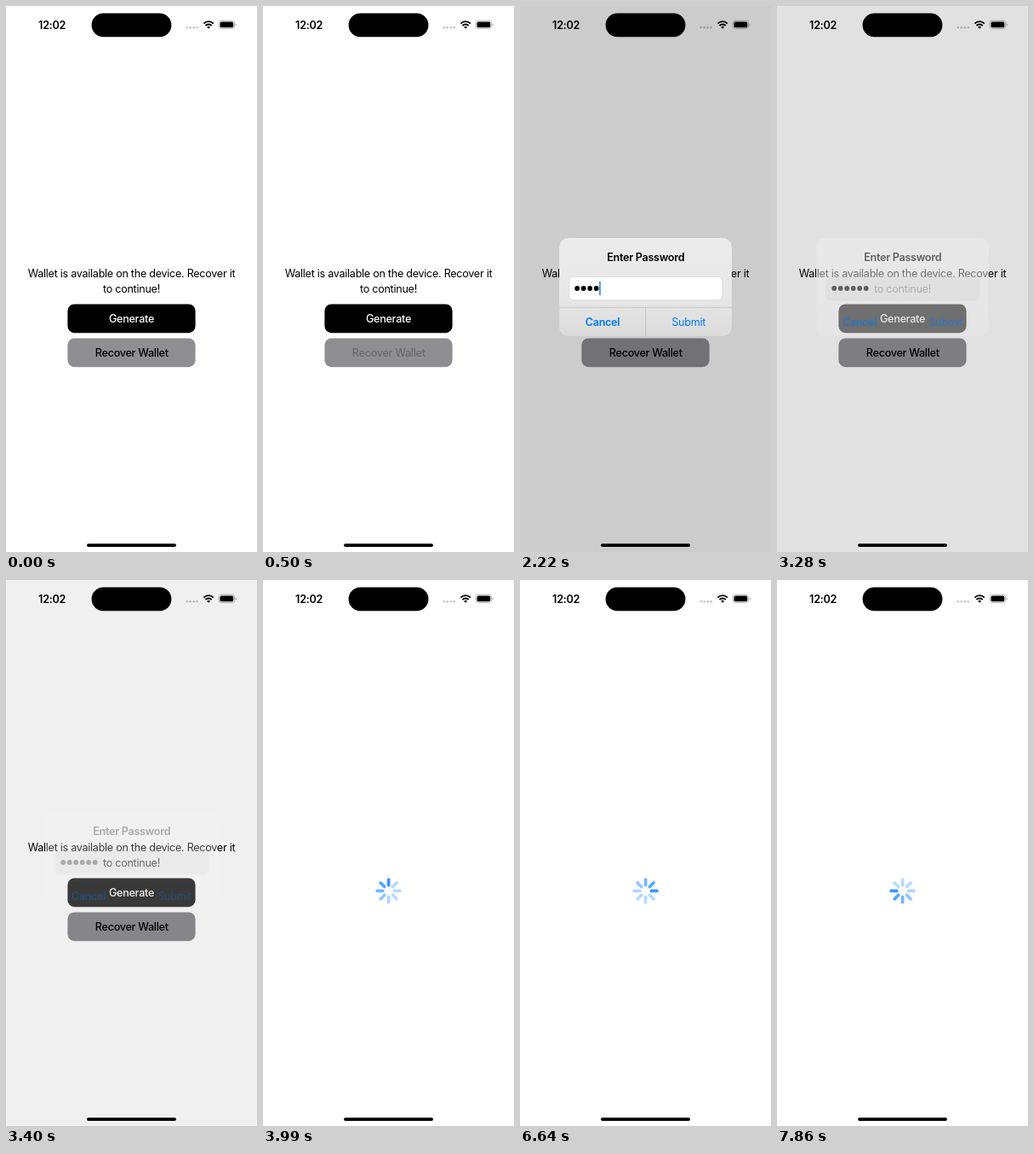
An HTML page for the animation above (8000 ms loop, 295 px wide and 640 px high).

```html
<!DOCTYPE html>
<html lang="en">
<head>
<meta charset="utf-8">
<title>Wallet recovery</title>
<style>
  html, body { margin: 0; width: 100%; height: 100%; overflow: hidden; background: #fff; }
  svg { display: block; width: 295px; height: 640px; }
  text { font: 400 12.6px Inter, sans-serif; letter-spacing: -.022em; text-anchor: middle; }
  .semi { font-weight: 600; }
  .medium { font-weight: 500; }
  .left { text-anchor: start; }
  .blue { fill: #007aff; }
</style>
</head>
<body>
<svg viewBox="0 0 295 640">
  <g id="home">
    <text x="147.5" y="318.4">Wallet is available on the device. Recover it</text>
    <text x="147.5" y="336.2">to continue!</text>
    <rect x="72.4" y="349.4" width="150.2" height="33.8" rx="8"/>
    <text class="medium" x="147.5" y="371" fill="#fff">Generate</text>
    <rect x="72.4" y="389.4" width="150.2" height="33.8" rx="8" fill="#8e8e93"/>
    <text class="medium" id="recover" x="147.8" y="411">Recover Wallet</text>
  </g>
  <g id="spinner" transform="translate(147.6 364.4)" stroke="#007aff" stroke-width="3.8" stroke-linecap="round"></g>

  <g id="status">
    <text class="semi" x="54.1" y="26.6">12:02</text>
    <g fill="#c4c4c6">
      <circle cx="212.7" cy="25.3" r="1.3"/><circle cx="216.7" cy="25.3" r="1.3"/>
      <circle cx="220.7" cy="25.3" r="1.3"/><circle cx="224.7" cy="25.3" r="1.3"/>
    </g>
    <g fill="none" stroke="#000" stroke-width="1.8">
      <path d="M232.4 20.6a8 8 0 0 1 11.4 0"/>
      <path d="M234.5 23a5.1 5.1 0 0 1 7.2 0"/>
    </g>
    <path d="M236.2 24.7a2.7 2.7 0 0 1 3.8 0l-1.9 2z"/>
    <rect x="250.2" y="17.2" width="18.4" height="9.4" rx="3" fill="none" stroke="#a5a5a5" stroke-width=".8"/>
    <rect x="251.5" y="18.5" width="15.8" height="6.8" rx="1.9"/>
    <path d="M269.7 20.4a1.6 1.6 0 0 1 0 3z" fill="#a5a5a5"/>
  </g>

  <rect id="dim" width="295" height="640"/>
  <rect x="100.6" y="8.5" width="93.8" height="27.7" rx="13.8"/>
  <rect x="95" y="630.2" width="105" height="3.8" rx="1.9"/>

  <g id="dialog">
    <linearGradient id="tint" x2="0" y2="1">
      <stop stop-opacity=".03"/><stop offset=".6" stop-opacity=".05"/><stop offset="1" stop-opacity=".1"/>
    </linearGradient>
    <rect id="panel" x="46.2" y="272" width="202.7" height="115" rx="10.5" fill="#f3f3f3"/>
    <rect id="shade" x="46.2" y="272" width="202.7" height="115" rx="10.5" fill="url(#tint)"/>
    <g id="content">
      <text class="semi" x="147.7" y="299.4">Enter Password</text>
      <rect id="field" x="57.8" y="317.5" width="180" height="27.3" rx="5" stroke="#cfcfd1" stroke-width=".6"/>
      <text class="left" id="hint" x="63" y="335.7" fill="#b8b8bb">PASSWORD</text>
      <g id="dots"></g>
      <rect id="caret" y="322.8" width="1.5" height="16.4" rx=".7" fill="#2f73e0"/>
      <path id="rules" d="M46.2 353.4h202.7M147.6 353.4V387" stroke="#3c3c43" stroke-opacity=".22" stroke-width=".8"/>
      <text class="semi blue" x="97" y="375.1">Cancel</text>
      <text class="blue" x="198.2" y="375.1">Submit</text>
    </g>
  </g>
</svg>
<script>
const LOOP = 8000, PRESS = 500, OPEN = 1020, TYPE = 1640, CLOSE = 3160, SPIN = 3740;
const FADE_STEP = 110, KEY_STEP = 290, SPIN_STEP = 100.3, SPIN_ZERO = 3955;
const DOTS = 6, DOT_GAP = 7.5, SPOKES = 8;

const $ = id => document.getElementById(id);
const show = (el, on) => el.style.display = on ? '' : 'none';

function add(parent, tag, attrs) {
  const el = document.createElementNS('http://www.w3.org/2000/svg', tag);
  for (const k in attrs) el.setAttribute(k, attrs[k]);
  return parent.appendChild(el);
}

const spokes = Array.from({ length: SPOKES }, (_, i) =>
  add($('spinner'), 'line', { y1: -6.9, y2: -13.3, transform: `rotate(${i * 360 / SPOKES})` }));
const dots = Array.from({ length: DOTS }, (_, i) =>
  add($('dots'), 'circle', { cx: 67.2 + i * DOT_GAP, cy: 331, r: 2.9 }));

// Dialog presence, 0 to 1: springs in, then eases out, in coarse steps.
function presence(t) {
  if (t < OPEN) return 0;
  const since = start => Math.floor((t - start) / FADE_STEP) + 1;
  if (t < CLOSE) return 1 - .25 ** since(OPEN);
  const k = since(CLOSE) / 5;
  return k < 1 ? Math.exp(-3.4 * k * k) : 0;
}

function drawDialog(t, p) {
  const solid = p ** 8;
  const scale = t < CLOSE ? 1 + .22 * (1 - p) : 1;
  const typed = Math.min(DOTS, t < TYPE ? 0 : 2 + Math.floor((t - TYPE) / KEY_STEP));
  const level = 220 + 35 * solid;

  $('dim').style.opacity = .2 * p;
  $('panel').style.opacity = .8 * p + .2 * solid;
  $('shade').style.opacity = p ** 3;
  $('content').style.opacity = p;
  $('rules').style.opacity = solid;
  $('field').style.fill = `rgb(${level}, ${level}, ${level})`;
  $('dialog').setAttribute('transform',
    `translate(147.5 329.5) scale(${scale}) translate(-147.5 -329.5)`);
  show($('hint'), !typed);
  dots.forEach((dot, i) => show(dot, i < typed));
  $('caret').setAttribute('x', 63.2 + typed * DOT_GAP);
  show($('caret'), t < CLOSE);
}

function drawSpinner(t) {
  const head = Math.floor((t - SPIN_ZERO) / SPIN_STEP) + SPOKES;
  spokes.forEach((spoke, i) => {
    const age = (head - i + SPOKES) % SPOKES;
    spoke.style.opacity = Math.max(.28, .78 - .12 * age);
  });
}

function draw() {
  const t = performance.now() % LOOP;
  const p = presence(t);
  const pressed = t >= PRESS && t < CLOSE;
  show($('home'), t < SPIN);
  show($('spinner'), t >= SPIN);
  $('recover').style.opacity = pressed ? Math.max(.25, p ** 3) : 1;
  drawDialog(t, p);
  drawSpinner(t);
  requestAnimationFrame(draw);
}
draw();
</script>
</body>
</html>
```
